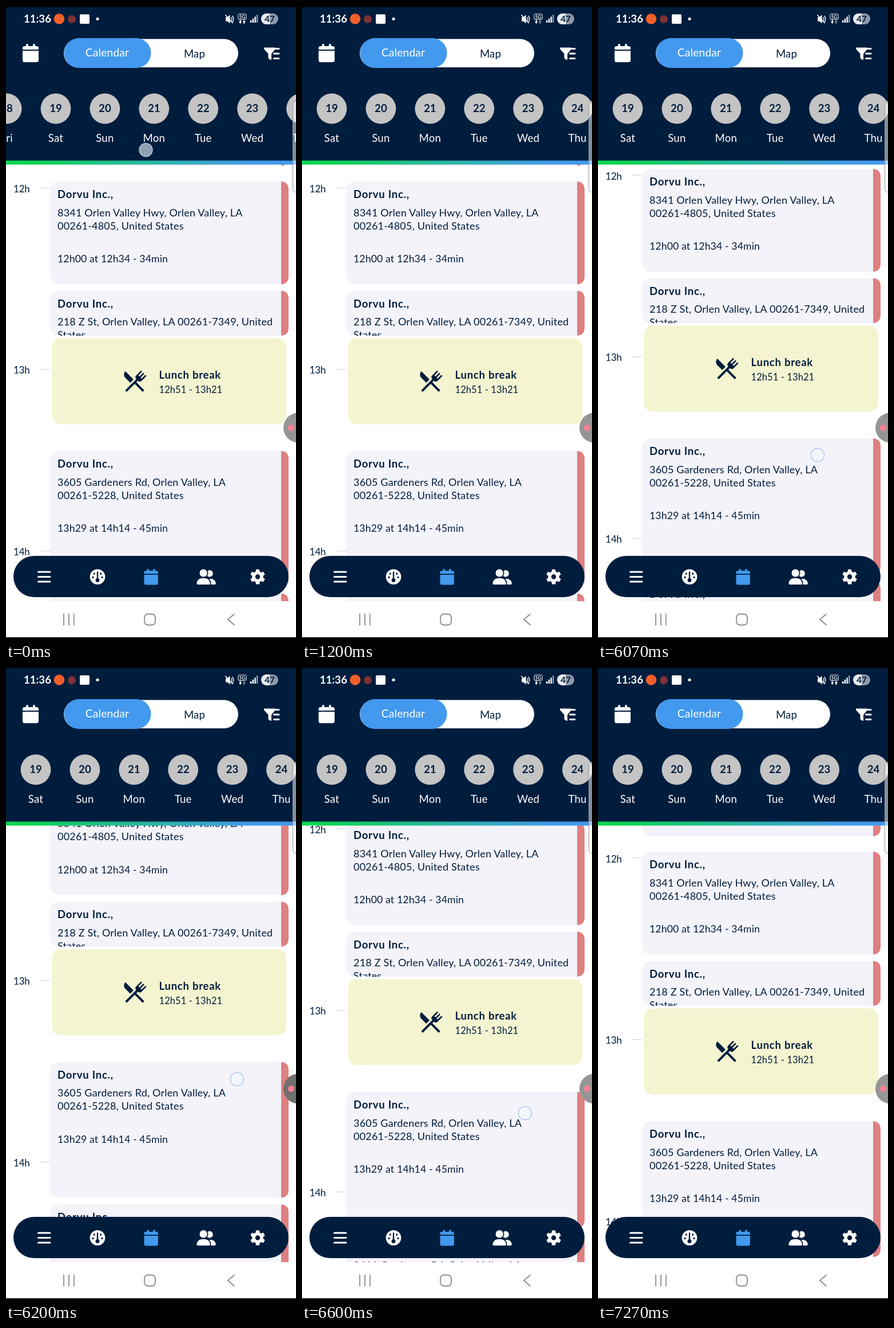
Animation, 507 px wide and 1104 px high, one loop 8000 ms. Source, as an HTML page:

```html
<!DOCTYPE html>
<html lang="en">
<head>
<meta charset="utf-8">
<title>Day planner</title>
<style>
  html, body { margin: 0; width: 100%; height: 100%; overflow: hidden; background: #fff; }
  svg { display: block; }
  #stage { width: 100vw; height: 100vh; }
  text { font-family: Lato, "Open Sans", sans-serif; font-size: 18px; fill: #001d3d; letter-spacing: .2px; }
  .bold { font-weight: 700; font-size: 18.5px; letter-spacing: .75px; }
  .time { font-size: 17.6px; letter-spacing: .15px; }
  .hour { font-size: 17px; letter-spacing: -.2px; }
  .mid { text-anchor: middle; }
  .light { fill: #fff; font-size: 18.6px; }
  .num { font-weight: 700; font-size: 18.6px; letter-spacing: 0; }
</style>
</head>
<body>
<svg id="stage" viewBox="0 0 507 1104" preserveAspectRatio="none">
  <defs>
    <linearGradient id="rainbow">
      <stop offset="0" stop-color="#0dd84f"/>
      <stop offset=".12" stop-color="#10d158"/>
      <stop offset=".85" stop-color="#429ae8"/>
      <stop offset="1" stop-color="#4299ee"/>
    </linearGradient>
    <clipPath id="view"><rect y="276" width="507" height="762"/></clipPath>
    <clipPath id="charge"><rect x="446" y="13" width="15" height="19"/></clipPath>
    <path id="calendar" d="M96 32V64H48C21.5 64 0 85.5 0 112v48H448V112c0-26.5-21.5-48-48-48H352V32c0-17.7-14.3-32-32-32s-32 14.3-32 32V64H160V32c0-17.7-14.3-32-32-32S96 14.3 96 32zM448 192H0V464c0 26.5 21.5 48 48 48H400c26.5 0 48-21.5 48-48V192z"/>
  </defs>

  <rect width="507" height="1104" fill="#fff"/>
  <g clip-path="url(#view)"><g id="agenda"></g></g>

  <!-- header -->
  <rect width="507" height="270" fill="#001d3d"/>
  <rect width="507" height="2" fill="#000"/>
  <rect y="269.6" width="507" height="7" fill="url(#rainbow)"/>
  <g id="days"></g>

  <!-- status bar -->
  <text x="31" y="29.3" class="num light">11:36</text>
  <circle cx="93" cy="22.5" r="9.3" fill="#f2602c"/>
  <circle cx="115" cy="23" r="7" fill="#7d3336"/>
  <rect x="129" y="14.5" width="17" height="16.5" rx="2" fill="#fff"/>
  <circle cx="160" cy="22.5" r="2.6" fill="#fff"/>
  <g fill="#fff">
    <path d="M384 19.5h3.2l4.3-4v15l-4.3-4H384z"/>
    <path d="M393.5 19.5q2.5 3.5 0 7M395.5 17q4.5 6 0 12" fill="none" stroke="#fff" stroke-width="1.3"/>
    <path d="M383.5 15.5l13 14.5" stroke="#fff" stroke-width="1.7"/>
    <rect x="406" y="14" width="14" height="9.5" rx="1.5" fill="none" stroke="#fff"/>
    <text x="413" y="21.6" class="mid" style="font-size:8px;font-weight:700;fill:#fff;letter-spacing:0">5G</text>
    <path d="M408.7 24.5h2v3h1.7l-2.7 3.5-2.7-3.5h1.7z"/>
    <path id="up" d="M415.3 31h2v-3h1.7l-2.7-3.5-2.7 3.5h1.7z"/>
    <path d="M427 25h2.4v4H427zM430.7 22h2.4v7h-2.4zM434.4 18.5h2.4V29h-2.4z"/>
    <path d="M438 15h2.4v14H438z" opacity=".55"/>
  </g>
  <rect x="446" y="13" width="30" height="19" rx="9.5" fill="#8d98a8"/>
  <rect x="446" y="13" width="30" height="19" rx="9.5" fill="#e8ebef" clip-path="url(#charge)"/>
  <text x="461" y="28" class="mid num" style="font-size:15.5px">47</text>

  <!-- toolbar -->
  <use href="#calendar" transform="translate(29 66) scale(.0625)" fill="#fff"/>
  <rect x="101" y="57.5" width="305" height="49.5" rx="24.7" fill="#fff"/>
  <rect x="101.5" y="56" width="152" height="52" rx="26" fill="#4299ee"/>
  <text x="177" y="88" class="mid light" style="font-size:19.2px">Calendar</text>
  <text x="329.5" y="89.5" class="mid" style="font-size:18.6px">Map</text>
  <path d="M451.5 72.5H470q2 1 .8 2.7l-6.8 8V93q-.8 1.5-2.3.6l-3.2-2.6v-7.8l-7.3-8q-1.2-1.9.3-2.7z" fill="#fff"/>
  <path d="M471 74.5h6M468.5 83h8.5M468.5 91.5h8.5" stroke="#fff" stroke-width="3" stroke-linecap="round"/>

  <!-- bottom menu -->
  <rect x="13" y="959" width="481" height="72" rx="36" fill="#001d3d"/>
  <path d="M56.5 987H77M56.5 995.5H77M56.5 1004H77" stroke="#fff" stroke-width="3" stroke-linecap="round"/>
  <g transform="translate(160 995.5)">
    <circle r="13.3" fill="#fff"/>
    <g fill="#001d3d">
      <circle cx="-8" cy="1" r="1.7"/><circle cx="-5.7" cy="-5.5" r="1.7"/>
      <circle cx="5.7" cy="-5.5" r="1.7"/><circle cx="8" cy="1" r="1.7"/>
      <circle cy="6" r="3.4"/>
    </g>
    <path d="M0 5V-8" stroke="#001d3d" stroke-width="2.4" stroke-linecap="round"/>
  </g>
  <use href="#calendar" transform="translate(241.5 981.5) scale(.0545)" fill="#4299ee"/>
  <path transform="translate(333.5 982.3) scale(.052)" fill="#fff" d="M96 128a128 128 0 1 1 256 0A128 128 0 1 1 96 128zM0 482.3C0 383.8 79.8 304 178.3 304h91.4C368.2 304 448 383.8 448 482.3c0 16.4-13.3 29.7-29.7 29.7H29.7C13.3 512 0 498.7 0 482.3zM609.3 512H471.4c5.4-9.4 8.6-20.3 8.6-32v-8c0-60.7-27.1-115.2-69.8-151.8h68.5C567.8 320 640 392.2 640 481.3c0 17-13.8 30.7-30.7 30.7zM432 256c-31 0-59-12.6-79.3-32.9C372.4 196.5 384 163.6 384 128c0-26.8-6.6-52.1-18.3-74.3C384.3 40.1 407.2 32 432 32c61.9 0 112 50.1 112 112s-50.1 112-112 112z"/>
  <g id="gear" transform="translate(440 995.5)" fill="#fff">
    <circle r="7" fill="none" stroke="#fff" stroke-width="5.6"/>
  </g>

  <!-- system keys -->
  <g fill="none" stroke="#8c8c8c" stroke-width="1.8" stroke-linecap="round" stroke-linejoin="round">
    <path d="M101 1060.5v19M110 1060.5v19M118.8 1060.5v19"/>
    <rect x="242" y="1060.5" width="19" height="19" rx="6"/>
    <path d="M399 1060.5l-11.3 9.5 11.3 9.5"/>
  </g>
  <rect y="1101" width="507" height="3" fill="#000"/>

  <!-- overlays -->
  <rect x="501.5" y="166" width="14" height="158.5" rx="5" fill="#fff" fill-opacity=".5" stroke="#969696"/>
  <circle id="bubble" cx="511" cy="735.5" r="26"/>
  <circle cx="498.5" cy="735.5" r="5.5" fill="#ff7f93"/>
  <circle id="touch" r="11.5" fill="#f4f8ff" fill-opacity=".6" stroke="#a9c6ea" stroke-width="1.4"/>
</svg>

<script>
const $ = id => document.getElementById(id);
const LOOP = 8000, FPS = 15;
const BUBBLE_Y = 735, CARD_Y = 776;

const label = (x, y, str, cls = '') => `<text x="${x}" y="${y}" class="${cls}">${str}</text>`;

// A nested svg cuts off text that does not fit its card.
function card(y, h, first, second, time) {
  const words = first ? label(13, 29, 'Dorvu Inc.,', 'bold') + label(13, 60.7, first) +
    label(13, 83.5, second) + label(13, 141.3, time, 'time') : '';
  return `<svg x="77" y="${y}" width="417" height="${h}">
    <path d="M404 0H18Q0 0 0 18V${h - 18}Q0 ${h} 18 ${h}H404z" fill="#f4f3fa"/>
    <path d="M404 0Q417 1 417 14V${h - 14}Q417 ${h - 1} 404 ${h}z" fill="#e07f80"/>${words}</svg>`;
}

const hour = i => {
  const y = 317 + i * 316.8;
  return `<path d="M59 ${y}h18" stroke="#dcdce0" stroke-width="1.3"/>` + label(13, y + 7.5, 12 + i + 'h', 'hour');
};

const lunch = `<rect x="80.5" y="579.5" width="409.5" height="150" rx="15" fill="#f4f4d0"/>
  <path transform="translate(200.8 630) scale(2.02)" fill="#001d3d" d="M8.1 13.34L3.91 9.16C2.35 7.59 2.35 5.06 3.91 3.5L10.93 10.5zM13.41 13L20.29 19.88 18.88 21.29 12 14.41 5.12 21.29 3.71 19.88 13.36 10.22 13.16 10C12.38 9.23 12.38 7.97 13.16 7.19L17.5 2.82 18.43 3.74 15.19 7 16.15 7.94 19.39 4.69 20.31 5.61 17.06 8.85 18 9.81 21.26 6.56 22.18 7.5 17.81 11.84C17.03 12.62 15.77 12.62 15 11.84L14.78 11.64z"/>` +
  label(267.5, 650, 'Lunch break', 'bold') +
  `<text x="267.5" y="675" class="time" style="font-size:16.4px">12h51 - 13h21</text>`;

$('agenda').innerHTML = [0, 1, 2].map(hour).join('') +
  card(79, 200) +
  card(306, 179.5, '8341 Orlen Valley Hwy, Orlen Valley, LA', '00261-4805, United States', '12h00 at 12h34 - 34min') +
  card(496.5, 78.5, '218 Z St, Orlen Valley, LA 00261-7349, United', 'States', '') +
  lunch +
  card(CARD_Y, 237, '3605 Gardeners Rd, Orlen Valley, LA', '00261-5228, United States', '13h29 at 14h14 - 45min') +
  card(1024.5, 250, '3611 Gardeners Rd, Orlen Valley, LA', '00261-5220, United States', '');

$('days').innerHTML = ['Fri', 'Sat', 'Sun', 'Mon', 'Tue', 'Wed', 'Thu'].map((day, i) => {
  const x = 52 + 85.9 * (i - 1);
  return `<circle cx="${x}" cy="179" r="26.4" fill="#c4c4c4"/>` +
    label(x, 185.3, 18 + i, 'mid num') + label(x, 237, day, 'mid light');
}).join('');

for (let a = 0; a < 360; a += 60)
  $('gear').innerHTML += `<rect x="-3.3" y="-13" width="6.6" height="5.5" rx="1.5" transform="rotate(${a})"/>`;

// Keys are [step, value...]; values between keys are linear.
const scrollKeys = [[90, 0], [91, -22], [92, -57], [93, -87.3], [94, -91], [96, -91], [97, -79],
  [98, -62], [99, -35], [100, -7], [101, 14.6], [102, 15.4], [103, 16]];
const touchKeys = [[90, 374, 817], [91, 384, 783], [92, 396, 748], [93, 404, 719], [94, 405, 715],
  [96, 405, 715], [97, 401, 730], [98, 395, 751.5], [99, 390, 778], [100, 385, 804], [101, 382.5, 822]];

function along(keys, n) {
  if (n <= keys[0][0]) return keys[0].slice(1);
  const i = keys.findIndex(k => k[0] >= n);
  if (i < 0) return keys[keys.length - 1].slice(1);
  const a = keys[i - 1], b = keys[i], p = (n - a[0]) / (b[0] - a[0]);
  return a.slice(1).map((v, j) => v + (b[j + 1] - v) * p);
}

const move = (id, x, y) => $(id).setAttribute('transform', `translate(${x} ${y})`);

function draw(t) {
  // The screen refreshes in steps of 1/15 s.
  const n = Math.floor((t + 4) * FPS / 1000);
  const [scroll] = along(scrollKeys, n);
  move('days', 35 * Math.pow(1 - Math.min(n / 8, 1), 2.4), 0);
  move('agenda', 0, scroll);

  // The floating button darkens while a card lies under it.
  $('bubble').setAttribute('fill', CARD_Y + scroll < BUBBLE_Y ? '#707070' : '#959595');

  const early = n < 1, late = n >= 90 && n < 104;
  $('touch').style.display = early || late ? '' : 'none';
  move('touch', ...(early ? [244.5, 251] : along(touchKeys, n)));
  $('up').style.opacity = n >= 18 && n < 109 ? .5 : 1;
}

function tick() {
  draw(performance.now() % LOOP);
  requestAnimationFrame(tick);
}
tick();
</script>
</body>
</html>
```
